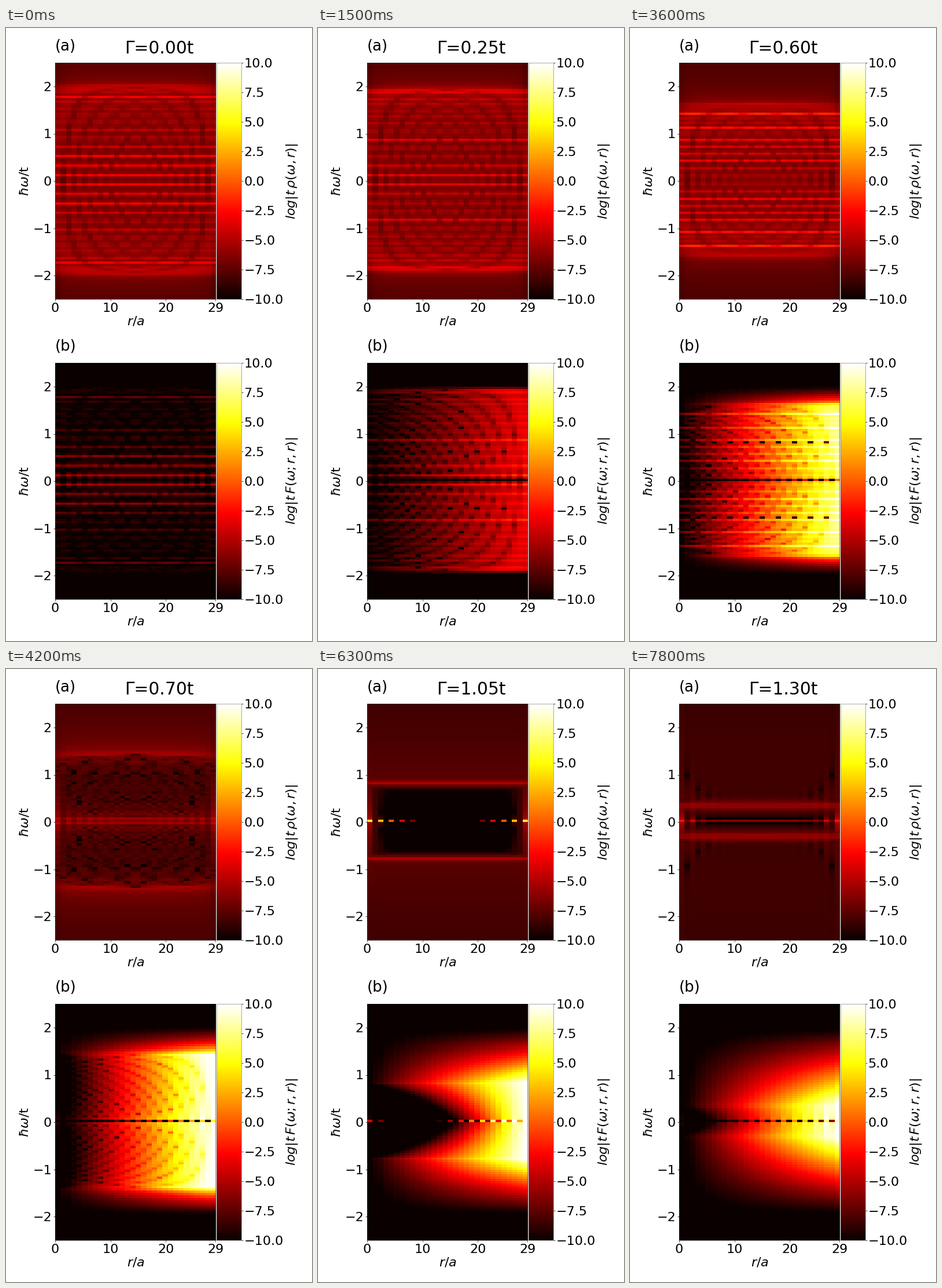
Recreate the animation shown at these times as a matplotlib script. Size 529 by 1058 pixels, loop 8 s.

```python
import numpy as np
import matplotlib.pyplot as plt
from matplotlib.animation import FuncAnimation

W, H, DPI = 529, 1058, 64
SITES = 30
PAIRING = 1e-10      # infinitesimal p-wave pairing, in units of t
ETA = 1e-7           # broadening
OMEGA = (np.arange(100) - 50) * 0.05
STEPS = 27           # Gamma = 0.00 ... 1.30
HOLD = 3             # animation frames per Gamma value
TEXT = 22.3          # tick and axis label size in pixels

plt.rcParams.update({"font.family": "DejaVu Sans", "mathtext.fontset": "dejavusans"})


def px(n):
    """Pixels to points."""
    return n * 72 / DPI


def chain(gamma):
    """BdG matrix of a chain with unequal left and right hopping."""
    up, down = np.eye(SITES, k=1), np.eye(SITES, k=-1)
    hop = (1 + gamma) * down + (1 - gamma) * up
    pair = PAIRING * (up - down)
    return np.block([[hop, pair], [pair.T, -hop.T]])


def maps(gamma):
    """log10 of the local density of states and of the local pair amplitude."""
    # An imaginary gauge transformation keeps the inversion well conditioned.
    skin = np.sqrt((1 + gamma) / max(abs(1 - gamma), 1e-9))
    base = min(skin, PAIRING ** (-1 / SITES))
    scale = base ** (np.arange(SITES) - (SITES - 1) / 2)
    d = np.concatenate([scale, 1 / scale])
    ham = chain(gamma) * d[None, :] / d[:, None]
    z = (OMEGA + 1j * ETA)[:, None, None]
    green = np.linalg.inv(z * np.eye(2 * SITES) - ham)
    j = np.arange(SITES)
    rho = -green[:, j, j].imag / np.pi
    pair = green[:, j, j + SITES] * scale ** 2
    return [np.log10(np.abs(a) + 1e-30) for a in (rho, pair)]


def axes_at(left, top, right, bottom):
    ax = fig.add_axes([left / W, 1 - bottom / H, (right - left) / W, (bottom - top) / H])
    for spine in ax.spines.values():
        spine.set_linewidth(px(0.5))
    return ax


def label(x, y, text, size=TEXT, **kw):
    return fig.text(x / W, 1 - y / H, text, fontsize=px(size), **kw)


def panel(top, tag, bar_text):
    """Heat map with its colour bar and labels; returns the image."""
    bottom, mid = top + 407.5, top + 203.75
    style = dict(labelsize=px(TEXT), length=px(3), width=px(0.7))

    ax = axes_at(85, top, 362.2, bottom)
    img = ax.imshow(np.zeros((len(OMEGA), SITES)), cmap="hot", vmin=-10, vmax=10,
                    origin="lower", aspect="auto", interpolation="nearest",
                    extent=(0, 29, -2.5, 2.5))
    ax.set_xticks([0, 10, 20, 29])
    ax.set_yticks(range(-2, 3))
    ax.tick_params(axis="x", pad=px(3.5), **style)
    ax.tick_params(axis="y", pad=px(3), **style)

    bar = axes_at(364.4, top, 406.5, bottom)
    bar.imshow(np.linspace(-10, 10, 256)[:, None], cmap="hot", origin="lower",
               aspect="auto", interpolation="nearest", extent=(0, 1, -10, 10))
    bar.set_xticks([])
    bar.yaxis.tick_right()
    ticks = np.linspace(-10, 10, 9)
    bar.set_yticks(ticks, [f"{v:.1f}".replace("-", "\u2212") for v in ticks])
    bar.tick_params(axis="y", pad=px(1.7), **style)
    for spine in bar.spines.values():
        spine.set_color("0.35")

    center = dict(ha="center", va="center")
    label(85, top - 21, tag, 26)
    label(224, top + 446, "$r/a$", **center)
    label(32.5, mid, r"$\hbar\omega$/t", rotation=90, **center)
    label(494.5, mid, bar_text, rotation=90, **center)
    return img


fig = plt.figure(figsize=(W / DPI, H / DPI), dpi=DPI, facecolor="white")
images = [panel(60.25, "(a)", r"$log|t\,\rho(\omega,r)|$"),
          panel(578.25, "(b)", r"$log|t\,F(\omega;r,r)|$")]
title = label(264.5, 44.5, "", 29.8, ha="center")

gammas = [0.05 * i for i in range(STEPS)]
data = [maps(g) for g in gammas]


def update(frame):
    step = min(frame // HOLD, STEPS - 1)
    for img, values in zip(images, data[step]):
        img.set_data(values)
    title.set_text(f"\u0393={gammas[step]:.2f}t")
    return [*images, title]


anim = FuncAnimation(fig, update, frames=80, interval=100, repeat=True, repeat_delay=0)
plt.show()
```
